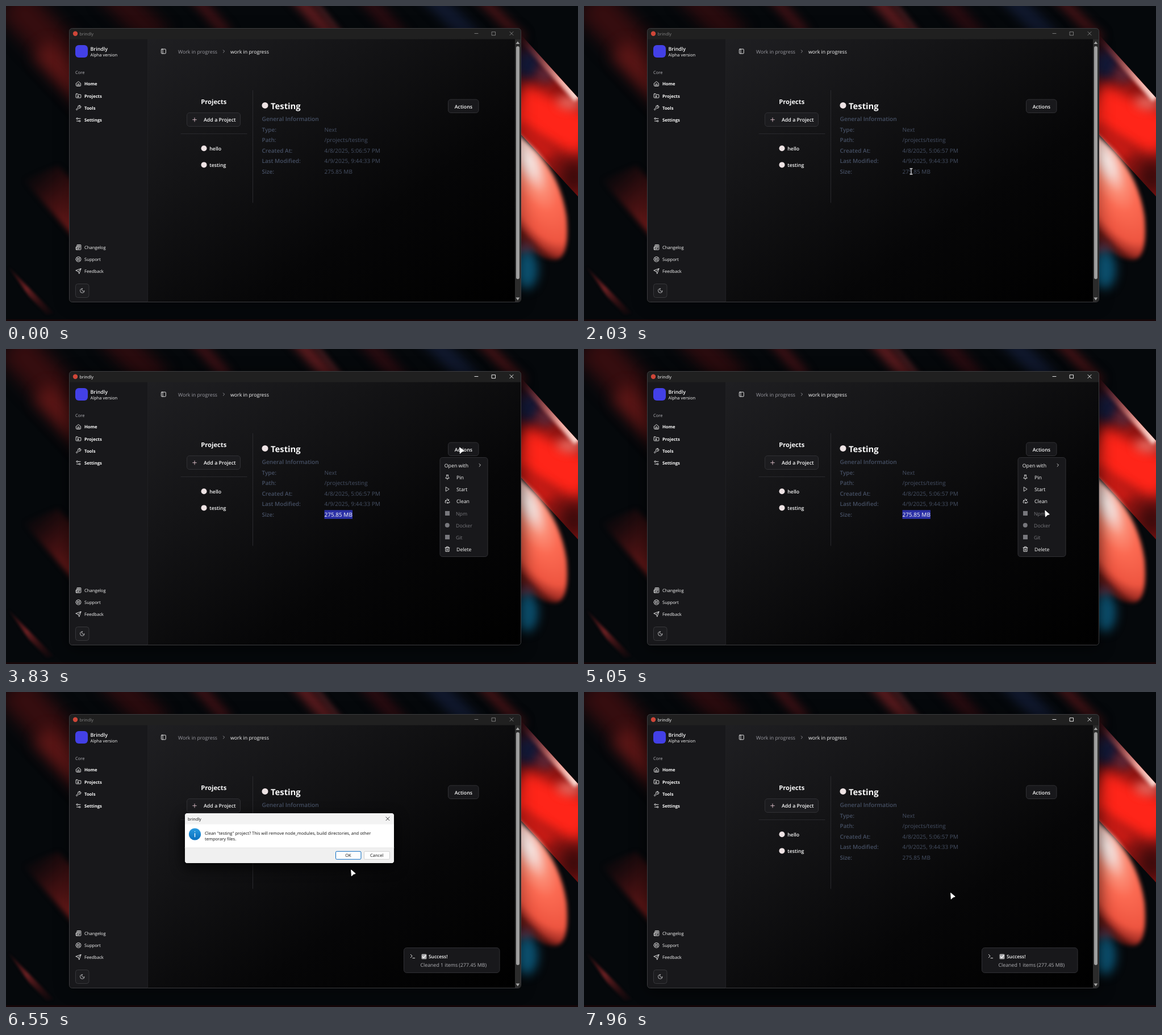
Animation, 1007 px wide and 556 px high, one loop 8 s. Source, as an HTML page:

```html
<!DOCTYPE html>
<html lang="en">
<head>
<meta charset="utf-8">
<title>Project manager</title>
<style>
html, body { margin: 0; width: 100%; height: 100%; overflow: hidden; background: #05080b; }
svg { display: block; width: 1007px; height: 556px; }
text { font-family: "Open Sans", "Noto Sans", sans-serif; text-rendering: geometricPrecision; white-space: pre; }
.icon { fill: none; stroke-linecap: round; stroke-linejoin: round; }
</style>
</head>
<body>
<svg id="stage" viewBox="0 0 1007 556" xmlns="http://www.w3.org/2000/svg"></svg>
<script>
const LOOP = 8000;
const PANEL = '#18181b', BUTTON = '#1c1c1f', EDGE = '#303034', WHITE = '#fafafa', DIM = '#465064';

const text = (x, y, size, str, fill = WHITE, weight = 400, extra = '') =>
  `<text x="${x}" y="${y}" font-size="${size}" fill="${fill}" font-weight="${weight}" ${extra}>${str}</text>`;
const rect = (x, y, w, h, fill, r = 0, stroke = 'none', extra = '') =>
  `<rect x="${x}" y="${y}" width="${w}" height="${h}" rx="${r}" fill="${fill}" stroke="${stroke}" ${extra}/>`;
const dot = (x, y, r, fill) => `<circle cx="${x}" cy="${y}" r="${r}" fill="${fill}"/>`;
const line = (d, stroke, w = 1) => `<path d="${d}" class="icon" stroke="${stroke}" stroke-width="${w}"/>`;
// Icons live on a 24 unit grid, centred on x, y.
const icon = (name, x, y, size = 10.5, stroke = WHITE) =>
  `<path class="icon" d="${ICONS[name]}" stroke="${stroke}" stroke-width="2"
    transform="translate(${x - size / 2} ${y - size / 2}) scale(${size / 24})"/>`;
const blur = n => `style="filter:blur(${n}px)"`;
const streak = (x1, y1, x2, y2, w, color, soft = 6, alpha = 1) =>
  `<path d="M${x1} ${y1}L${x2} ${y2}" stroke="${color}" stroke-width="${w}" opacity="${alpha}" ${blur(soft)}/>`;
const blob = (x, y, rx, ry, color, soft, alpha = 1) =>
  `<ellipse cx="${x}" cy="${y}" rx="${rx}" ry="${ry}" fill="${color}" opacity="${alpha}" ${blur(soft)}/>`;

const ring = (x, y, r) => `M${x - r} ${y}a${r} ${r} 0 1 0 ${2 * r} 0a${r} ${r} 0 1 0 ${-2 * r} 0`;
const ICONS = {
  home: 'M3 10l9-7 9 7v10a1 1 0 0 1-1 1H4a1 1 0 0 1-1-1zM9 21v-8h6v8',
  folder: 'M4 4h5l2 3h9a2 2 0 0 1 2 2v9a2 2 0 0 1-2 2H4a2 2 0 0 1-2-2V6a2 2 0 0 1 2-2zM10 11l4 3-4 3z',
  wrench: 'M14.7 6.3a1 1 0 0 0 0 1.4l1.6 1.6a1 1 0 0 0 1.4 0l3.8-3.8a6 6 0 0 1-7.9 7.9l-6.9 6.9a2.1 2.1 0 0 1-3-3l6.9-6.9a6 6 0 0 1 7.9-7.9z',
  sliders: 'M20 7h-9M14 17H5' + ring(17, 17, 3) + ring(7, 7, 3),
  news: 'M4 22h16a2 2 0 0 0 2-2V4a2 2 0 0 0-2-2H8a2 2 0 0 0-2 2v16a2 2 0 0 1-4 0v-9h4M18 14h-8M15 18h-5M10 6h8v4h-8z',
  buoy: ring(12, 12, 10) + ring(12, 12, 4) + 'M5 5l4 4M15 9l4-4M15 15l4 4M9 15l-4 4',
  send: 'M22 2L15 22 11 13 2 9zM22 2L11 13',
  moon: 'M12 3a6 6 0 0 0 9 9 9 9 0 1 1-9-9z',
  panel: 'M5 3h14a2 2 0 0 1 2 2v14a2 2 0 0 1-2 2H5a2 2 0 0 1-2-2V5a2 2 0 0 1 2-2zM9 3v18',
  right: 'M9 18l6-6-6-6',
  plus: 'M4 12h16M12 4v16',
  pin: 'M12 17v5M8 3h8M9 3v7l-4 4v3h14v-3l-4-4V3',
  play: 'M6 3l14 9-14 9z',
  recycle: 'M7 19H4l-2-3 4-7M11 19h9l2-3-2-3M14 16l-3 3 3 3M8 9H4M6 9l1 4M9 6l3-4 5 7M13 9h4l1-4',
  trash: 'M3 6h18M19 6v15H5V6M8 6V2h8v4M10 11v6M14 11v6',
  prompt: 'M4 17l6-6-6-6M12 19h8'
};

const wallpaper = () => `
  <rect width="1007" height="556" fill="#05080b"/>
  ${streak(10, -10, 165, 156, 66, '#360d0f', 15)}
  ${streak(62, 75, 150, 168, 40, '#641817', 13, .85)}
  ${streak(180, -30, 270, 60, 50, '#2a0b0e', 12)}
  ${streak(320, -30, 390, 50, 20, '#3a1014', 8)}
  ${streak(500, -30, 580, 60, 24, '#581a1d', 8)}
  ${streak(535, -20, 590, 50, 6, '#6e2c30', 5, .6)}
  ${streak(620, -30, 700, 60, 26, '#290b10', 9)}
  ${streak(735, -30, 825, 60, 32, '#10182d', 9)}
  ${streak(820, -30, 910, 60, 18, '#421215', 8)}
  <path d="M30 306L130 420V322L92 282Z" fill="url(#ember)" ${blur(5)}/>
  <path d="M4 460L84 542 72 545 40 512Z" fill="url(#spark)" ${blur(2)}/>
  <g clip-path="url(#slab)">
    <rect x="850" width="160" height="345" fill="url(#glow)"/>
    ${blob(918, 104, 24, 26, '#121a3a', 10)}
    ${blob(950, 122, 16, 13, '#5a2a3c', 9)}
    ${streak(896, 172, 1025, 232, 76, '#ff2519', 11)}
    ${streak(900, 215, 960, 265, 30, '#c81b15', 9)}
    ${blob(1000, 302, 26, 32, '#3a0a0b', 14)}
    ${blob(992, 170, 22, 12, '#f07a70', 9, .8)}
    <path d="M906 51L1007 163" stroke="url(#rim)" stroke-width="16" ${blur(3)}/>
  </g>
  <path d="M895 219L935 257Q977 305 987 372Q993 444 968 448Q940 450 895 405Z" fill="url(#beam)" ${blur(3.5)}/>
  ${blob(912, 428, 16, 14, '#5a2634', 7)}
  ${blob(916, 465, 20, 34, '#0c5474', 9)}
  <rect y="553" width="1007" height="3" fill="#160608"/>`;

const navItem = (y, name, label, weight) =>
  icon(name, 127.5, y) + text(138, y + 3, 7.65, label, WHITE, weight);
const infoRow = (y, label, value) =>
  text(450.5, y, 10, label, DIM, 600) + text(560.5, y, 10, value, DIM);
const menuItem = (y, glyph, x, label, fill) => glyph + text(x, y + 3.2, 8.75, label, fill);

const appWindow = () => `
  <rect id="shade" x="109" y="44" width="799" height="484" rx="8" fill="#000" ${blur(14)}/>
  ${rect(111.5, 39.5, 795, 483, '#202020', 5, '#3c3c3f')}
  ${dot(122, 48.7, 4.2, '#cf4638')}
  ${text(129.5, 51.7, 7.5, 'brindly', WHITE, 400, 'class="chrome"')}
  <g class="chrome">
    ${line('M825 48.5H831M855.5 45.7h6v6h-6zM887 45.5l6 6M893 45.5l-6 6', '#fff', .9)}
  </g>
  <path d="M249 58.5H906V517Q906 522 901 522H249Z" fill="url(#main)"/>
  <path d="M112 58.5H249V522H117Q112 522 112 517Z" fill="${PANEL}"/>
  ${line('M249.5 58.5V522', '#1f1f23')}
  ${rect(122, 69, 22, 22, '#4340e6', 6)}
  ${text(148.5, 78.5, 8.9, 'Brindly', WHITE, 600)}
  ${text(148.5, 88.8, 7.5, 'Alpha version')}
  ${text(122, 120.4, 7.5, 'Core', '#b4b4b9', 500)}
  ${navItem(137.3, 'home', 'Home', 700)}
  ${navItem(158.5, 'folder', 'Projects', 700)}
  ${navItem(179.7, 'wrench', 'Tools', 700)}
  ${navItem(200.9, 'sliders', 'Settings', 700)}
  ${navItem(425.8, 'news', 'Changelog', 500)}
  ${navItem(447, 'buoy', 'Support', 500)}
  ${navItem(468.2, 'send', 'Feedback', 500)}
  ${rect(122.5, 490.5, 23.5, 24, '#1d1d20', 4, '#37373b')}
  ${icon('moon', 134.3, 502.6, 10, '#d8d8da')}
  ${icon('panel', 277.3, 80, 10.5)}
  ${text(303, 84, 8.75, 'Work in progress', '#9a9aa1')}
  ${icon('right', 383.5, 80, 9, '#b5b5ba')}
  ${text(395, 84, 8.75, 'work in progress')}

  ${text(343.2, 173, 11.2, 'Projects', WHITE, 700)}
  ${rect(318.5, 188.5, 94, 24, BUTTON, 4.5, EDGE)}
  ${icon('plus', 332, 200.7, 10, '#f3d3dc')}
  ${text(348, 204.3, 8.85, 'Add a Project', WHITE, 600)}
  ${line('M308 225.5H424', '#29292d')}
  ${line('M434.5 149V347', '#2a2a2e')}
  ${dot(348.5, 251.2, 5, '#eee3e4')}
  ${text(358.3, 254.8, 8.75, 'hello', WHITE, 600)}
  ${dot(348.5, 280.4, 5, '#eee3e4')}
  ${text(358.3, 284, 8.75, 'testing', WHITE, 600)}

  ${dot(456, 175.4, 5.5, '#eee3e4')}
  ${text(466, 182, 14.8, 'Testing', WHITE, 700)}
  ${text(450.5, 203, 10.2, 'General Information', DIM, 600)}
  ${infoRow(221.7, 'Type:', 'Next')}
  ${infoRow(240.3, 'Path:', '/projects/testing')}
  ${infoRow(258.9, 'Created At:', '4/8/2025, 5:06:57 PM')}
  ${infoRow(277.4, 'Last Modified:', '4/9/2025, 9:44:33 PM')}
  <rect id="mark" x="560.5" y="284.3" height="15.5" fill="#2b30a6"/>
  ${infoRow(296, 'Size:', '<tspan id="num">275.85</tspan><tspan id="unit"> MB</tspan>')}
  ${rect(778.5, 165, 53.5, 23.5, PANEL, 4.5, EDGE)}
  ${text(789.8, 180.5, 8.75, 'Actions', WHITE, 600)}

  <g id="bar">
    <path d="M896 58.5H906V517Q906 522 901 522H896Z" fill="#2b2b2b"/>
    ${rect(898, 71, 6, 411, '#9f9f9f', 3)}
    <path d="M897.5 67L900.9 62.5 904.3 67ZM897.5 514.5L900.9 519.5 904.3 514.5Z" fill="#a6a6a6"/>
  </g>`;

const GREY = '#77777c';
const actionsMenu = () => `
  <g id="menu">
    ${rect(764, 191.5, 84, 175, PANEL, 4.5, EDGE)}
    ${text(771.8, 209, 8.75, 'Open with')}${icon('right', 834.3, 205, 9.5)}
    ${menuItem(226.8, icon('pin', 777, 226.2, 10), 793, 'Pin', WHITE)}
    ${menuItem(248, icon('play', 777, 247.4, 9.5), 793, 'Start', WHITE)}
    ${menuItem(269.2, icon('recycle', 777, 268.6, 10), 793, 'Clean', WHITE)}
    ${menuItem(290.5, rect(773, 286, 8, 8, GREY), 792, 'Npm', GREY)}
    ${menuItem(311.8, dot(776.8, 311, 4, GREY), 792, 'Docker', GREY)}
    ${menuItem(333, rect(773, 328, 8, 8, GREY), 792, 'Git', GREY)}
    ${menuItem(354.2, icon('trash', 777, 353.4, 10.5), 793, 'Delete', WHITE)}
  </g>`;

const toast = () => `
  <g clip-path="url(#pane)"><g id="toast">
    ${rect(700.5, 451.5, 168.5, 44, PANEL, 5, EDGE)}
    ${icon('prompt', 716, 466.5, 11)}
    ${rect(731.5, 462.5, 9, 9, '#a9a9ac', 1.5)}
    ${line('M733.3 467.2l2 2.1 3.6-4.5', '#fff', 1.3)}
    ${text(744, 470.2, 8.4, 'Success!', WHITE, 600)}
    ${text(729.5, 484.5, 8.8, 'Cleaned 1 items (277.45 MB)', '#b3b3b7')}
  </g></g>`;

const dialog = () => `
  <g id="dialog">
    <rect x="313" y="220" width="372" height="90" rx="6" fill="#000" opacity=".75" ${blur(12)}/>
    ${rect(315, 214, 368, 88, '#fff', 4.5)}
    <path d="M315 233.5V218.5Q315 214 319.5 214H678.5Q683 214 683 218.5V233.5Z" fill="#f3f3f3"/>
    <path d="M315 275H683V297.5Q683 302 678.5 302H319.5Q315 302 315 297.5Z" fill="#f0f0f0"/>
    ${line('M315 275H683', '#dfdfdf', .7)}
    ${text(320, 226.7, 7.3, 'brindly', '#111')}
    ${line('M669 220.7l6 6M675 220.7l-6 6', '#222', .9)}
    ${dot(332.5, 251, 10.6, 'url(#info)')}
    ${line('M332.5 249.7V255.5M332.5 246.3V246.4', '#fff', 1.3)}
    ${text(350, 252, 7.54, 'Clean "testing" project? This will remove node_modules, build directories, and other', '#111')}
    ${text(350, 262.4, 7.54, 'temporary files.', '#111')}
    ${rect(580.5, 281.3, 44.5, 14, '#fdfdfd', 2, '#0a6cc4')}
    ${rect(630.5, 281.3, 45, 14, '#fdfdfd', 2, '#d0d0d0')}
    ${text(602.5, 291.2, 7.5, 'OK', '#111', 400, 'text-anchor="middle"')}
    ${text(652.7, 291.2, 7.5, 'Cancel', '#111', 400, 'text-anchor="middle"')}
  </g>`;

const stops = (...list) => list.map(([at, color, alpha = 1]) =>
  `<stop offset="${at}" stop-color="${color}" stop-opacity="${alpha}"/>`).join('');
const fade = (id, x1, y1, x2, y2, ...list) =>
  `<linearGradient id="${id}" gradientUnits="userSpaceOnUse" x1="${x1}" y1="${y1}" x2="${x2}" y2="${y2}">
    ${stops(...list)}</linearGradient>`;
const defs = `<defs>
  <linearGradient id="main" x1="0" y1="0" x2="1" y2="1">
    ${stops([0, '#1f1f22'], [.3, '#141416'], [.65, '#060607'], [1, '#000'])}</linearGradient>
  ${fade('ember', 35, 300, 118, 390, [0, '#3a0c0e', 0], [.5, '#4e1213', .7], [1, '#7a1d1c'])}
  ${fade('spark', 4, 460, 80, 543, [0, '#4a1014', .3], [.45, '#6a2022'], [1, '#300a0d', .2])}
  ${fade('glow', 885, 30, 955, 145, [0, '#1c0a10', 0], [.45, '#330c12'], [1, '#8c1412'])}
  ${fade('rim', 906, 51, 1007, 163, [0, '#8a3038', 0], [.35, '#b05a58', .6], [.7, '#f0a8a0'], [1, '#ffe0d8'])}
  <radialGradient id="beam" gradientUnits="userSpaceOnUse" cx="0" cy="0" r="1"
    gradientTransform="translate(920 272) rotate(66) scale(195 76)">
    ${stops([0, '#fdeeea'], [.14, '#f6d2cb'], [.32, '#fb8d76'], [.5, '#fb6a52'], [.8, '#ee5540'], [.93, '#a83026'], [1, '#5a1612'])}</radialGradient>
  <linearGradient id="info" x1="0" y1="0" x2="0" y2="1">${stops([0, '#2a9be0'], [1, '#0a6fbd'])}</linearGradient>
  <clipPath id="slab"><path d="M861 0L1007 162V336L906 226 850 170V0Z"/></clipPath>
  <clipPath id="pane"><path d="M249 58.5H906V522H249Z"/></clipPath>
</defs>`;

const pointer = `
  <path id="arrow" d="M.7 .7L8.2 7.2 4.6 8.3 1.3 11.6Z" fill="#fff" stroke="#fff" stroke-width="1" stroke-linejoin="round"/>
  <path id="caret" class="icon" d="M-2 -5h4M0 -5V5M-2 5h4" stroke="#d5d5d8" stroke-width="1.3"/>`;

const stage = document.getElementById('stage');
stage.innerHTML = defs + wallpaper() + appWindow() + actionsMenu() + toast() + dialog() + pointer;
const get = id => document.getElementById(id);
const [shade, bar, mark, num, unit, menu, note, box, arrow, caret] =
  ['shade', 'bar', 'mark', 'num', 'unit', 'menu', 'toast', 'dialog', 'arrow', 'caret'].map(get);
const chrome = [...document.querySelectorAll('.chrome')];

// Pointer path: time, x, y
const PATH = [
  [260, 924, 526], [390, 855, 306], [630, 855, 306], [1330, 798, 174], [1560, 798, 174],
  [1850, 540, 311], [2030, 576, 292], [2160, 576, 292], [2290, 574, 293], [3010, 574, 293],
  [3190, 755, 225], [3330, 790, 194], [3640, 798, 173], [4130, 798, 173], [4480, 808, 250],
  [4730, 817, 308], [4930, 812, 291], [5050, 811, 283], [5200, 810, 266], [5330, 810, 266],
  [5700, 641, 354], [5950, 641, 354], [6550, 606, 311], [6650, 602, 285], [7830, 602, 285], [7960, 645, 354]
];

// Monotone cubic along one column of PATH.
const speed = (i, k) => i < 0 || i >= PATH.length - 1 ? 0 :
  (PATH[i + 1][k] - PATH[i][k]) / (PATH[i + 1][0] - PATH[i][0]);
const tangent = (i, k) => {
  const a = speed(i - 1, k), b = speed(i, k);
  return a * b <= 0 ? 0 : 2 * a * b / (a + b);
};
function along(t, k) {
  if (t >= PATH[PATH.length - 1][0]) return PATH[PATH.length - 1][k];
  const i = Math.max(0, PATH.findIndex(p => p[0] > t) - 1);
  const [p, q] = [PATH[i], PATH[i + 1]], span = q[0] - p[0];
  const u = Math.max(0, (t - p[0]) / span), v = 1 - u;
  return p[k] * v * v * (1 + 2 * u) + q[k] * u * u * (3 - 2 * u) +
    span * u * v * (tangent(i, k) * v - tangent(i + 1, k) * u);
}

const ramp = (t, a, b) => Math.min(1, Math.max(0, (t - a) / (b - a)));
const easeOut = u => 1 - (1 - u) ** 3;
const show = (el, on) => el.setAttribute('visibility', on ? 'visible' : 'hidden');
function pop(el, amount, x, y, from) {
  const s = from + (1 - from) * amount;
  show(el, amount > 0);
  el.setAttribute('opacity', amount);
  el.setAttribute('transform', `translate(${x} ${y}) scale(${s}) translate(${-x} ${-y})`);
}

function draw(now) {
  const t = now % LOOP;
  const tick = 1000 / 30, step = Math.floor((t + 8) / tick) * tick - 4;

  const focused = t >= 2490 && t < 5860 || t >= 6780;
  shade.setAttribute('opacity', focused ? .6 : .3);
  chrome.forEach(el => el.setAttribute('opacity', focused ? 1 : .45));

  const picked = t >= 2620 && t < 5330, all = picked && t >= 2780;
  show(mark, picked);
  mark.setAttribute('width', all ? 49.5 : 30.5);
  num.setAttribute('fill', picked ? WHITE : DIM);
  unit.setAttribute('fill', all ? WHITE : DIM);

  pop(menu, easeOut(ramp(step, 3680, 3830)) * (1 - ramp(step, 5330, 5430)), 806, 191, .95);
  show(bar, t < 3680 || t >= 5430);

  const rise = easeOut(ramp(step, 5430, 5680));
  show(note, rise > 0);
  note.setAttribute('opacity', rise);
  note.setAttribute('transform', `translate(0 ${44 * (1 - rise)})`);

  pop(box, easeOut(ramp(step, 5960, 6130)) * (1 - ramp(step, 6780, 6940)), 499, 258, .93);

  const x = along(step, 1), y = along(step, 2);
  const onText = x > 557 && x < 662 && y > 212 && y < 300 && t < 5000;
  const at = `translate(${x.toFixed(2)} ${y.toFixed(2)})`;
  arrow.setAttribute('transform', at);
  caret.setAttribute('transform', at);
  show(arrow, t >= 260 && !onText);
  show(caret, t >= 260 && onText);
}

const start = performance.now();
function frame() {
  draw(performance.now() - start);
  requestAnimationFrame(frame);
}
frame();
</script>
</body>
</html>
```
